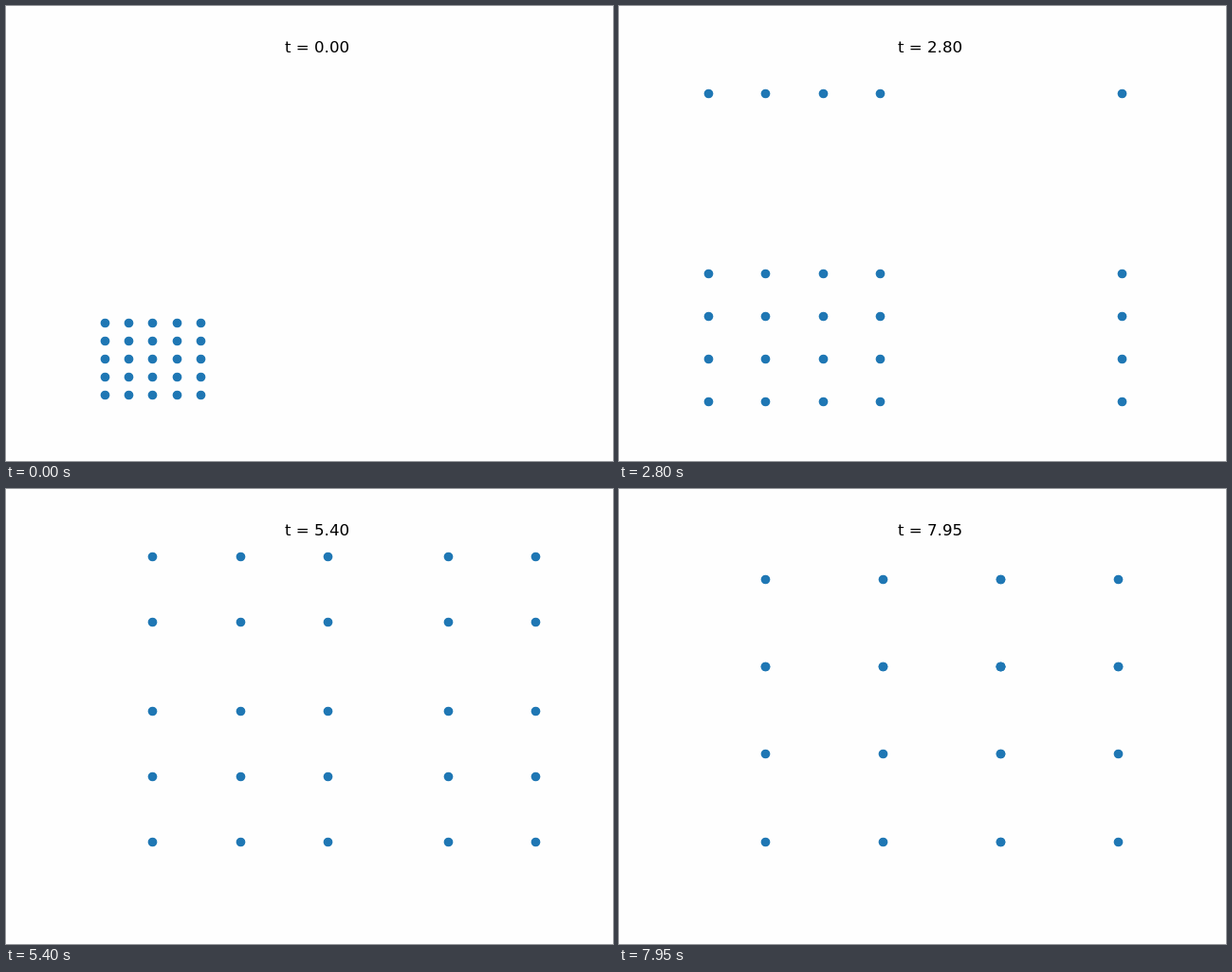
Recreate the animation shown at these times as an HTML page with a canvas. Size 640 by 480 pixels, loop 8000 ms.

```html
<!DOCTYPE html>
<html lang="en">
<head>
<meta charset="utf-8">
<title>Expanding grid</title>
<style>
  html, body { margin: 0; width: 100%; height: 100%; overflow: hidden; background: #fefefe; }
  canvas { display: block; }
</style>
</head>
<body>
<canvas id="stage" width="640" height="480"></canvas>
<script>
const ctx = document.getElementById('stage').getContext('2d');

const LOOP = 8000, STEP = 50;
const PLOT = { left: 80, bottom: 427.2, width: 496, height: 369.6 };
const CENTER = 0.15;   // fixed point of the expansion, in box units
const GAP = 0.05;      // initial spacing
const RATE = 0.00125;  // spacing gained per step
const RADIUS = 4.86;
const OFFSETS = [-2, -1, 0, 1, 2];

// Periodic box of side 1.
const wrap = u => u < 0 ? u + 1 : u;

// Dots sit on whole pixels.
const snap = v => Math.round(v) + 0.5;

function draw(step) {
  ctx.fillStyle = '#fefefe';
  ctx.fillRect(0, 0, 640, 480);

  ctx.fillStyle = '#000';
  ctx.font = '16.667px "DejaVu Sans", sans-serif';
  ctx.textAlign = 'center';
  ctx.fillText('t = ' + (step * STEP / 1000).toFixed(2), 328, 49);

  const gap = GAP + RATE * (step + 1);
  const places = OFFSETS.map(k => wrap(CENTER + k * gap));

  ctx.save();
  ctx.beginPath();
  ctx.rect(80, 58, 497, 370);
  ctx.clip();
  ctx.fillStyle = '#1f77b4';
  for (const u of places) {
    for (const v of places) {
      ctx.beginPath();
      ctx.arc(snap(PLOT.left + u * PLOT.width),
              snap(PLOT.bottom - v * PLOT.height), RADIUS, 0, 2 * Math.PI);
      ctx.fill();
    }
  }
  ctx.restore();
}

const start = performance.now();

function tick() {
  const time = (performance.now() - start) % LOOP;
  draw(Math.floor(time / STEP));
  requestAnimationFrame(tick);
}

tick();
</script>
</body>
</html>
```
